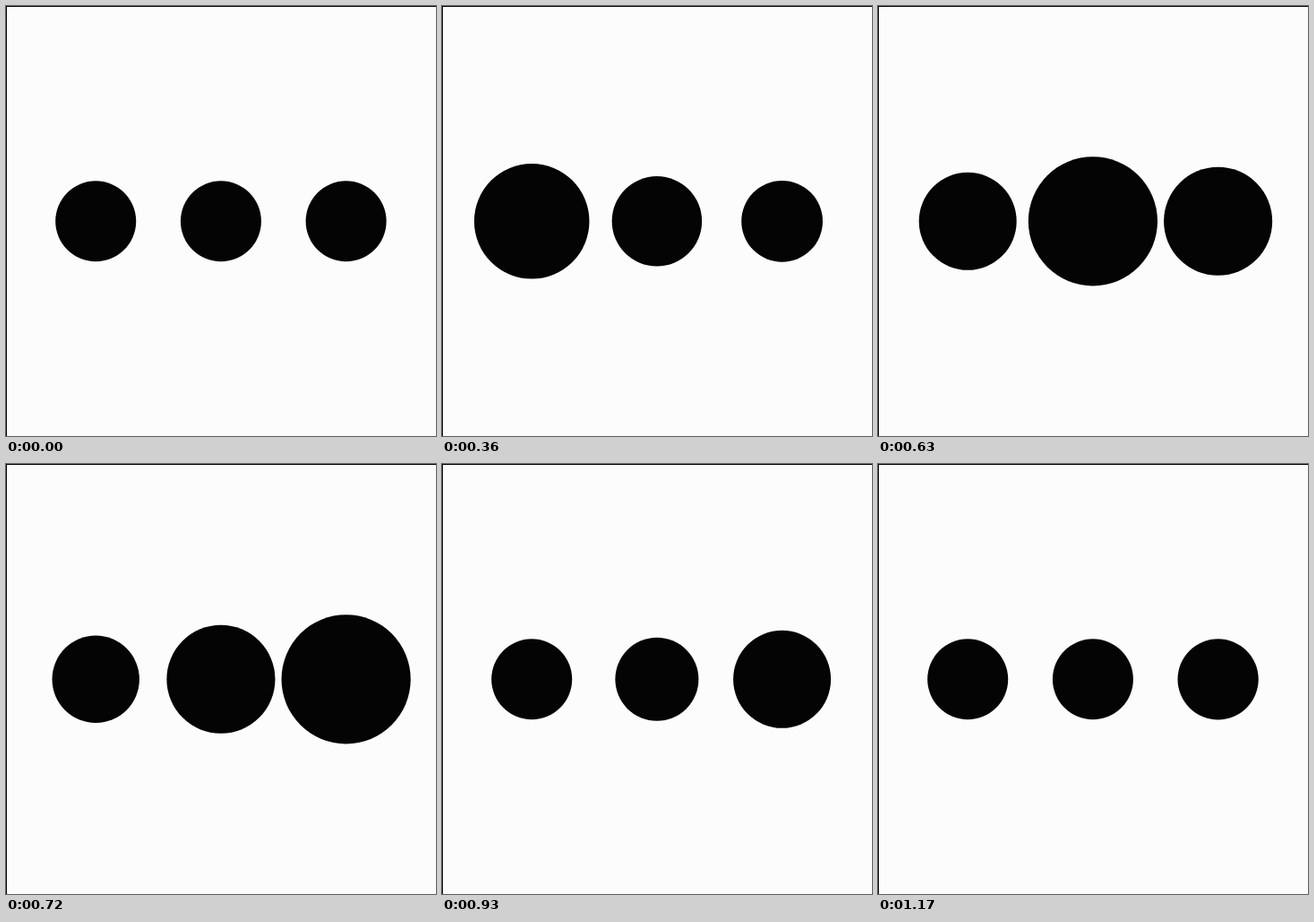
An HTML page for the animation above (1200 ms loop, 480 px wide and 480 px high).

```html
<!DOCTYPE html>
<html lang="en">
<head>
<meta charset="utf-8">
<title>Pulsing dots</title>
<style>
  html, body { margin: 0; height: 100%; overflow: hidden; background: #fcfcfc; }
  svg { display: block; width: 100vw; height: 100vh; fill: #040404; }
</style>
</head>
<body>
<svg viewBox="0 0 480 480">
  <path d="M0 0H480V1H1V480H0Z"/>
  <circle class="dot" cx="100.2" cy="240.3" r="45"/>
  <circle class="dot" cx="239.9" cy="240.3" r="45"/>
  <circle class="dot" cx="379.6" cy="240.3" r="45"/>
</svg>
<script>
  const LOOP = 1200, STEP = 30, STAGGER = 150, RISE = 450;
  const MIN_R = 45, MAX_R = 75;
  const dots = document.querySelectorAll('.dot');

  // One axis of a cubic Bezier running from 0 to 1
  const bezier = (s, a, b) =>
    3 * s * (1 - s) ** 2 * a + 3 * s * s * (1 - s) * b + s ** 3;

  function ease(x) {
    let low = 0, high = 1;
    for (let i = 0; i < 24; i++) {
      const mid = (low + high) / 2;
      if (bezier(mid, 0.656, 0.816) < x) low = mid; else high = mid;
    }
    return bezier(low, 0, 0.8);
  }

  function draw(now) {
    const time = Math.floor((now % LOOP) / STEP) * STEP;
    dots.forEach((dot, i) => {
      const fromPeak = Math.abs(time - i * STAGGER - RISE);
      const swell = ease(Math.max(0, 1 - fromPeak / RISE));
      dot.setAttribute('r', MIN_R + (MAX_R - MIN_R) * swell);
    });
  }

  const start = performance.now();
  function tick() {
    draw(performance.now() - start);
    requestAnimationFrame(tick);
  }
  tick();
</script>
</body>
</html>
```
